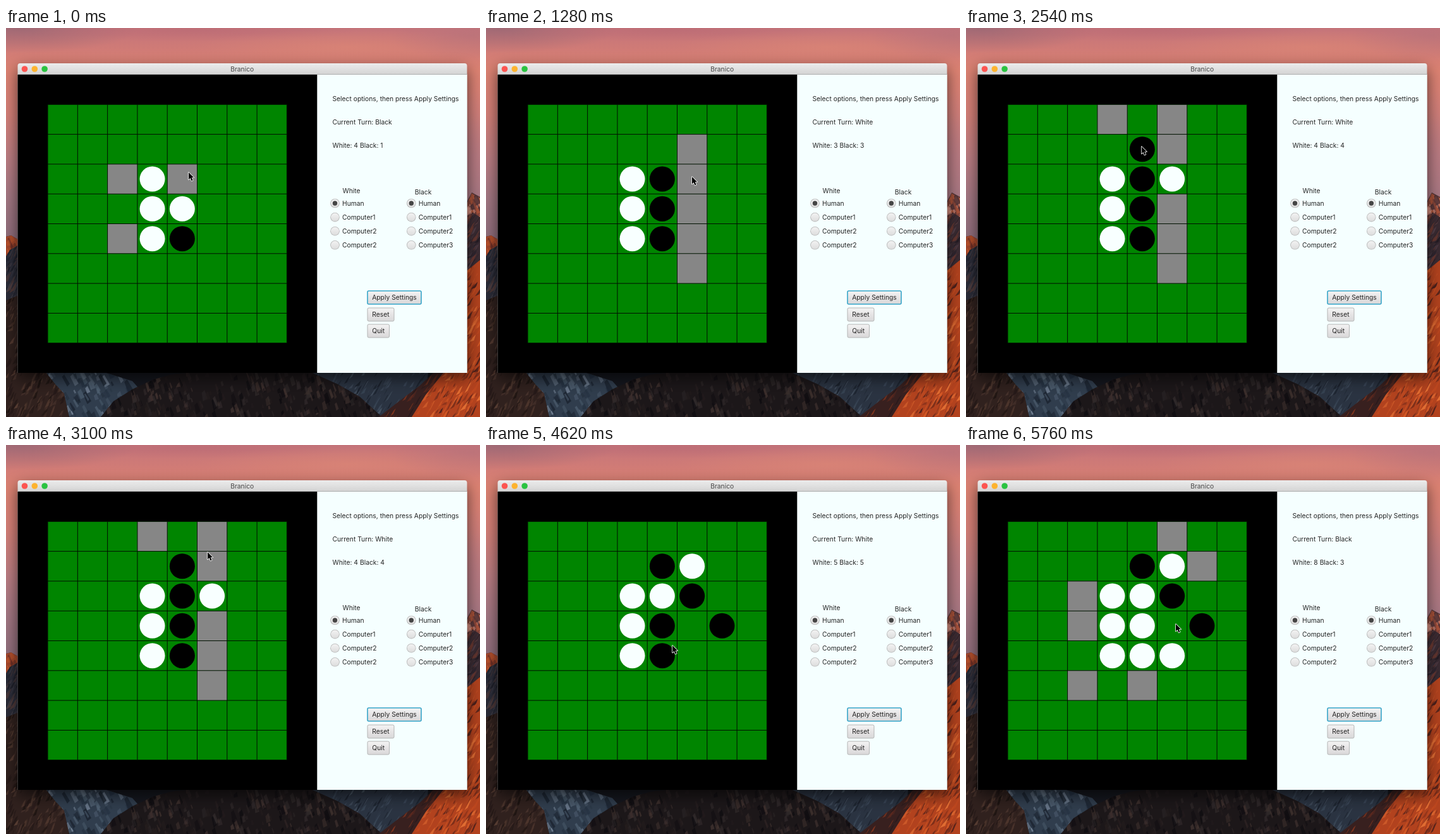
An HTML page with a canvas that plays this animation: 750 px wide and 617 px high, repeating every 5780 ms.

```html
<!DOCTYPE html>
<html lang="en">
<head>
<meta charset="utf-8">
<title>Branico</title>
<style>
  html, body { margin: 0; width: 100%; height: 100%; overflow: hidden; background: #000; }
  canvas { display: block; width: 750px; height: 617px; }
</style>
</head>
<body>
<canvas id="stage" width="750" height="617"></canvas>
<script>
const W = 750, H = 617, LOOP = 5780;
const FONT = 'Inter, Roboto, "Open Sans", sans-serif';
const CELL = 47.3, LEFT = 66, TOP = 121.3;

// Each state: start time, turn, white discs, black discs, legal moves (column + row).
const states = [
  [0,    'Black', '32 33 43 34', '44', '22 42 24'],
  [180,  'White', '32 33 34', '42 43 44', '51 52 53 54 55'],
  [1400, 'Black', '32 42 52 33 43 34', '44', '41 22 24'],
  [2500, 'White', '32 52 33 34', '41 42 43 44', '30 50 51 53 54 55'],
  [3260, 'Black', '51 32 42 52 33 34', '41 43 44', ''],
  [4200, 'White', '51 32 42 33 34', '41 52 43 63 44', ''],
  [5200, 'Black', '51 32 42 33 43 34 44 54', '41 52 63', '50 61 22 23 25 45']
];

// Pointer keys: time, x, y
const path = [
  [0, 289, 229], [160, 288, 230], [580, 156, 245], [1280, 326, 236],
  [1460, 326, 236], [2000, 228, 194], [2400, 277, 188], [2600, 278, 188],
  [3100, 319, 170], [3260, 324, 180], [3680, 348, 331], [4120, 374, 284],
  [4260, 374, 284], [4620, 295, 318], [5060, 324, 331], [5240, 324, 331],
  [5760, 332, 284]
];

function rng(seed) {
  return () => {
    seed = (seed * 1664525 + 1013904223) >>> 0;
    return seed / 4294967296;
  };
}

function layer() {
  const c = document.createElement('canvas');
  c.width = W; c.height = H;
  return c;
}

function poly(g, pts) {
  g.beginPath();
  for (let i = 0; i < pts.length; i += 2) g.lineTo(pts[i], pts[i + 1]);
  g.closePath();
}

function gradient(g, y0, y1, colors) {
  const fill = g.createLinearGradient(0, y0, 0, y1);
  colors.forEach((c, i) => fill.addColorStop(i / (colors.length - 1), c));
  return fill;
}

// A rock face: an outline filled with random slanted facets.
function rock(g, pts, base, tones, count, slant, seed) {
  const rand = rng(seed);
  const xs = pts.filter((_, i) => i % 2 === 0), ys = pts.filter((_, i) => i % 2);
  const x0 = Math.min(...xs), y0 = Math.min(...ys);
  const w = Math.max(...xs) - x0, h = Math.max(...ys) - y0;
  g.save();
  poly(g, pts);
  g.fillStyle = base;
  g.fill();
  g.clip();
  for (let i = 0; i < count; i++) {
    const x = x0 + rand() * w, y = y0 + rand() * h;
    const s = 3 + rand() * 9, t = 1 + rand() * 4;
    g.globalAlpha = 0.35 + rand() * 0.5;
    g.fillStyle = tones[Math.floor(rand() * tones.length)];
    poly(g, [x, y, x + t, y - t, x + t + s * slant, y + s, x + s * slant - t * rand(), y + s * 1.4]);
    g.fill();
  }
  g.restore();
}

function glow(g, x, y, rx, ry, color) {
  g.save();
  g.translate(x, y);
  g.scale(rx, ry);
  const fill = g.createRadialGradient(0, 0, 0, 0, 0, 1);
  fill.addColorStop(0, color);
  fill.addColorStop(1, color.slice(0, 7) + '00');
  g.fillStyle = fill;
  g.fillRect(-1, -1, 2, 2);
  g.restore();
}

function landscape(g) {
  g.fillStyle = gradient(g, 0, 340, ['#c4747a', '#dc8272', '#d58078', '#bd7e83', '#a37783', '#8f6e7c']);
  g.fillRect(0, 0, W, 340);
  glow(g, 20, 0, 190, 40, '#8f6472b0');
  glow(g, 300, 4, 260, 18, '#b8687390');
  glow(g, 540, 30, 240, 28, '#e08a7580');
  glow(g, 735, 12, 130, 40, '#b2717b80');
  glow(g, 740, 200, 40, 100, '#b0758080');

  g.fillStyle = '#15171e';
  g.fillRect(0, 345, W, H);
  rock(g, [0, 331, 8, 329, 20, 336, 20, 440, 0, 440], '#2b2c38',
    ['#48434d', '#1c1e28', '#5b3e38'], 70, -0.5, 3);
  rock(g, [0, 331, 8, 329, 20, 336, 20, 344, 6, 352, 0, 362], '#a6482c', ['#cb5b2c', '#6a2d25'], 24, 0.6, 4);
  rock(g, [40, 545, 120, 535, 200, 560, 250, 617, 70, 617], '#303d4d',
    ['#4f6072', '#1b2430', '#78879a', '#253242'], 150, 0.8, 8);
  rock(g, [480, 545, 670, 530, 660, 617, 540, 617], '#2a3341',
    ['#3d4a5b', '#161c26', '#52606f'], 130, -0.7, 9);
  rock(g, [150, 617, 170, 592, 200, 573, 232, 558, 260, 550, 300, 545, 480, 545, 525, 565, 560, 585, 595, 617],
    '#1c1719', ['#30292a', '#0e0c10', '#40322f', '#251d1e'], 330, 0.5, 12);
  rock(g, [0, 432, 20, 424, 20, 545, 62, 545, 78, 565, 92, 580, 100, 617, 0, 617],
    '#30211e', ['#4a342d', '#19110f', '#5b4034', '#241817'], 300, -0.4, 15);

  rock(g, [728, 278, 737, 261, 750, 268, 750, 440, 728, 440], '#3a2b32',
    ['#54404a', '#211a22', '#743b31', '#2c2935'], 150, -0.7, 20);
  rock(g, [728, 281, 737, 262, 750, 269, 750, 300, 738, 292, 728, 310],
    '#84453a', ['#bd593a', '#4b2f34', '#d89180'], 44, 0.6, 21);
  rock(g, [728, 386, 750, 368, 750, 617, 624, 617, 640, 590, 670, 560, 690, 545, 728, 545],
    '#b2421e', ['#df6128', '#6e2819', '#ef7a39', '#3a1b1b', '#c94d20'], 480, -0.6, 25);
  rock(g, [590, 617, 622, 592, 655, 567, 676, 547, 692, 547, 664, 582, 642, 617],
    '#38201f', ['#612a1e', '#1f171a', '#8e3a20'], 70, -0.7, 30);
}

function text(g, str, x, y, size = 10.3, color = '#252525', align = 'left') {
  g.font = `${size}px ${FONT}`;
  g.textAlign = align;
  g.textBaseline = 'alphabetic';
  g.fillStyle = color;
  g.fillText(str, x, y);
}

function disc(g, x, y, r, color) {
  g.beginPath();
  g.arc(x, y, r, 0, Math.PI * 2);
  g.fillStyle = color;
  g.fill();
}

function button(g, label, y, w, focused) {
  g.beginPath();
  g.roundRect(572, y, w, 21, 2);
  g.fillStyle = gradient(g, y, y + 21, ['#f4f4f4', '#e6e4e5', '#d9d8d9']);
  g.fill();
  g.lineWidth = focused ? 1.6 : 1;
  g.strokeStyle = focused ? '#36a5c9' : '#b4b4b4';
  g.stroke();
  text(g, label, 572 + w / 2, y + 14.2, 10.3, '#252525', 'center');
}

function radios(g, x, labels) {
  labels.forEach((label, i) => {
    const y = 278 + i * 22.1;
    disc(g, x, y, 7.3, '#b4b4b4');
    disc(g, x, y, 6.5, gradient(g, y - 7, y + 7, ['#f3f3f3', '#dcdcdc']));
    if (!i) disc(g, x, y, 3.7, '#444');
    text(g, label, x + 11.5, y + 4);
  });
}

function windowFrame(g) {
  g.save();
  g.shadowColor = 'rgba(0,0,0,.6)';
  g.shadowBlur = 24;
  g.shadowOffsetY = 9;
  g.beginPath();
  g.roundRect(18.5, 56, 711, 491, [4, 4, 0, 0]);
  g.fillStyle = gradient(g, 56, 74, ['#ececec', '#d3d3d3']);
  g.fill();
  g.restore();

  g.fillStyle = '#aeaeae';
  g.fillRect(18.5, 73, 711, 1);
  ['#fc5550', '#fdb32f', '#2bc340'].forEach((c, i) => disc(g, 29.5 + i * 15.8, 65, 4.8, c));
  text(g, 'Branico', 373.7, 69, 10.3, '#474747', 'center');

  g.fillStyle = '#000';
  g.fillRect(18.5, 74, 474, 473);
  g.fillStyle = '#f5ffff';
  g.fillRect(492.5, 74, 237, 473);

  text(g, 'Select options, then press Apply Settings', 516.5, 115.6);
  text(g, 'White', 532.5, 262.2);
  text(g, 'Black', 646.8, 263.8);
  radios(g, 520.5, ['Human', 'Computer1', 'Computer2', 'Computer2']);
  radios(g, 641.3, ['Human', 'Computer1', 'Computer2', 'Computer3']);
  button(g, 'Apply Settings', 417, 85, true);
  button(g, 'Reset', 444, 42);
  button(g, 'Quit', 470, 34.5);

  g.fillStyle = '#008500';
  g.fillRect(LEFT, TOP, CELL * 8, CELL * 8);
}

function each(list, draw) {
  if (list) list.split(' ').forEach(s => draw(LEFT + s[0] * CELL, TOP + s[1] * CELL));
}

function grid(g) {
  g.fillStyle = '#001000';
  for (let i = 0; i <= 8; i++) {
    g.fillRect(LEFT - 0.5 + i * CELL, TOP, 1, CELL * 8);
    g.fillRect(LEFT, TOP - 0.5 + i * CELL, CELL * 8, 1);
  }
}

function pointer(g, t) {
  let i = 0;
  while (i < path.length - 2 && path[i + 1][0] <= t) i++;
  const [t0, x0, y0] = path[i], [t1, x1, y1] = path[i + 1];
  const p = Math.min(1, (t - t0) / (t1 - t0)), e = p * p * (3 - 2 * p);
  g.save();
  g.translate(x0 + (x1 - x0) * e, y0 + (y1 - y0) * e);
  poly(g, [0, 0, 0, 11.5, 2.6, 9, 4.6, 13.4, 6.6, 12.5, 4.7, 8.3, 8.2, 8.2]);
  g.lineJoin = 'round';
  g.lineWidth = 1.6;
  g.strokeStyle = '#fff';
  g.stroke();
  g.fillStyle = '#000';
  g.fill();
  g.restore();
}

const backdrop = layer();
landscape(backdrop.getContext('2d'));
windowFrame(backdrop.getContext('2d'));

const ctx = document.getElementById('stage').getContext('2d');
const start = performance.now();

function render(now) {
  const t = Math.max(0, now - start) % LOOP;
  const [, turn, white, black, legal] = states.filter(s => s[0] <= t).pop();
  const piece = color => (x, y) => disc(ctx, x + CELL / 2, y + CELL / 2, 20, color);
  const total = list => list.split(' ').length;

  ctx.drawImage(backdrop, 0, 0);
  ctx.fillStyle = '#868686';
  each(legal, (x, y) => ctx.fillRect(x, y, CELL, CELL));
  grid(ctx);
  each(white, piece('#f8ffff'));
  each(black, piece('#000'));
  text(ctx, `Current Turn: ${turn}`, 516.5, 152.8);
  text(ctx, `White: ${total(white)} Black: ${total(black)}`, 516.5, 189.8);
  pointer(ctx, t);
  requestAnimationFrame(render);
}
requestAnimationFrame(render);
</script>
</body>
</html>
```
